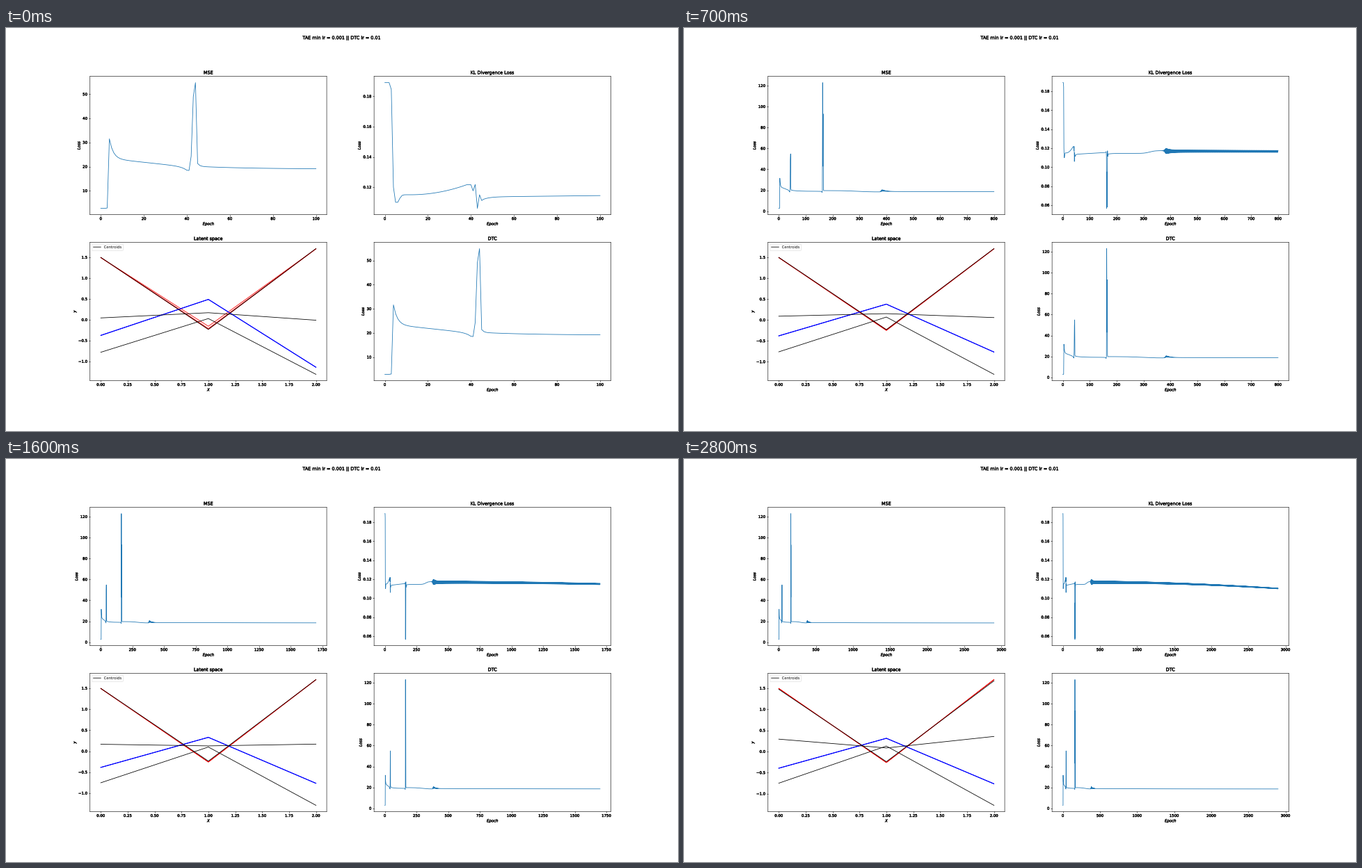
Write a matplotlib script that moves like this. It is 966x580 px and loops after 2.9 s.

```python
import numpy as np
import matplotlib
import matplotlib.pyplot as plt
from matplotlib.animation import FuncAnimation
from matplotlib.patheffects import Normal, withStroke

WIDTH, HEIGHT, DPI = 966, 580, 38.64
FRAMES, INTERVAL, STEP = 29, 100, 100

matplotlib.rcParams.update({
    "font.family": "DejaVu Sans",
    "font.size": 10,
    "text.hinting": "none",
    "path.snap": False,
    "axes.linewidth": 1.1,
    "axes.labelpad": 4.8,
    "xtick.major.width": 1.1,
    "ytick.major.width": 1.1,
})
HEAVY = [withStroke(linewidth=0.7, foreground="black")]

epochs = np.arange(FRAMES * STEP + 1)
flip = np.where(epochs % 2, -1, 1)  # the instability alternates every epoch


def after(start, tau):
    """1 up to start, then exponential decay."""
    return np.exp(-np.clip(epochs - start, 0, None) / tau)


def before(end, tau):
    """Exponential build-up that reaches 1 at end."""
    return np.exp(-np.clip(end - epochs, 0, None) / tau)


def step(middle, width):
    return 0.5 + 0.5 * np.tanh((epochs - middle) / (2 * width))


def phases(*parts):
    """Join (first epoch, values) parts; each overrides those before it."""
    out = np.zeros(len(epochs))
    for first, values in parts:
        out[first:] = values[first:]
    return out


ring = step(380, 1.5) * after(384, 15)  # burst of oscillation

mse = phases(
    (0, 2.7 + 0.3 * step(3, 0.1)),
    (4, 23.7 - 0.095 * epochs + 8.2 * after(4, 1.8) - 1.4 * before(40, 2.5)),
    (42, 19 + 1.1 * after(45, 25) + 1.2 * after(45, 1) - before(161, 2)),
    (162, 18.4 + 1.3 * step(290, -25) + 0.4 * step(383, 3) * after(383, 900)
     + (1.2 + 0.8 * flip) * ring))
mse[42:45] = 24.3, 49, 54.8
mse[163:167] = 122.9, 43, 93, 21

kl_wave = (0.0013 * step(377, 3) * after(400, 1900) + 0.0017 * ring) * flip
kl = phases(
    (0, 0.18906 - 0.009 * step(3, 0.1)),
    (4, 0.115 - 0.0055 * np.exp(-((epochs - 5.5) / 1.6) ** 2)
     + 0.0066 * np.clip((epochs - 12) / 26, 0, 1) ** 2),
    (46, 0.1136 + 0.0018 * (epochs - 46) / 114 - 0.0015 * after(46, 3)
     + 0.0009 * before(161, 2)),
    (162, 0.1145 - 0.0007 * after(168, 12) + 0.0029 * step(322, 10)
     - 0.0006 * step(383, 3)
     - 0.0066 * np.clip((epochs - 400) / 2500, 0, 1) ** 1.9 + kl_wave))
kl[4] = 0.12
kl[41:46] = 0.1176, 0.1218, 0.106, 0.115, 0.1112
kl[162:168] = 0.112, 0.0566, 0.095, 0.058, 0.1172, 0.1115


def samples(t):
    """Latent vectors of the two classes at progress t in 0..1."""
    reds = [("red", (1.495, -0.26 + spread * np.exp(-5 * t), 1.705))
            for spread in (0.105, 0.05, 0.03)]
    blues = [("blue", (-0.375 - 0.02 * t + shift,
                       0.31 + 0.18 * np.exp(-3.8 * t) + shift,
                       -0.765 - 0.375 * np.exp(-20 * t) + shift))
             for shift in (-0.003, 0, 0.003)]
    return reds + blues


def centroids(t):
    top = (1.5 - 0.025 * t ** 4, -0.23 - 0.01 * t, 1.71 - 0.035 * t ** 4)
    flat = (0.045 + 0.16 * t + 0.089 * t ** 2,
            0.17 - 0.064 * t - 0.021 * t ** 2,
            -0.01 + 0.24 * t + 0.128 * t ** 2)
    low = (-0.75 - 0.03 * (1 - t) ** 3, 0.03 + 0.1 * t ** 0.65,
           -1.31 + 0.035 * t)
    return [("black", values) for values in (top, flat, low)]


fig, axes = plt.subplots(
    2, 2, dpi=DPI, figsize=((WIDTH + 0.01) / DPI, (HEIGHT + 0.01) / DPI),
    facecolor="white")
fig.subplots_adjust(left=0.125, right=0.9, bottom=0.125, top=0.88,
                    wspace=0.2, hspace=0.2)
fig.suptitle("TAE min lr = 0.001 || DTC lr = 0.01", fontsize=12,
             path_effects=HEAVY)
(ax_mse, ax_kl), (ax_latent, ax_dtc) = axes


def label(ax, title, xlabel, ylabel):
    ax.set_title(title, fontsize=12, path_effects=HEAVY)
    ax.set_xlabel(xlabel, style="italic", path_effects=HEAVY)
    ax.set_ylabel(ylabel, style="italic", path_effects=HEAVY)


losses = []
for ax, title, data in ((ax_mse, "MSE", mse),
                        (ax_kl, "KL Divergence Loss", kl),
                        (ax_dtc, "DTC", mse + kl)):
    label(ax, title, "Epoch", "Loss")
    line, = ax.plot([], [], color="#1f77b4", lw=1.5)
    losses.append((line, data))

label(ax_latent, "Latent space", "X", "y")
latent = [ax_latent.plot(range(3), values, color=color, lw=1.5)[0]
          for color, values in samples(0) + centroids(0)]
legend = ax_latent.legend([latent[-1]], ["Centroids"], loc="upper left")
legend.get_texts()[0].set_path_effects([Normal()])


def update(frame):
    last = (frame + 1) * STEP
    for line, data in losses:
        line.set_data(epochs[:last + 1], data[:last + 1])
    t = frame / (FRAMES - 1)
    for line, (_, values) in zip(latent, samples(t) + centroids(t)):
        line.set_ydata(values)
    for ax in axes.flat:
        ax.relim()
        ax.autoscale_view()
        for text in ax.get_xticklabels() + ax.get_yticklabels():
            text.set_path_effects(HEAVY)
    return []


anim = FuncAnimation(fig, update, frames=FRAMES, interval=INTERVAL,
                     repeat=True, repeat_delay=0, blit=False)
plt.show()
```
